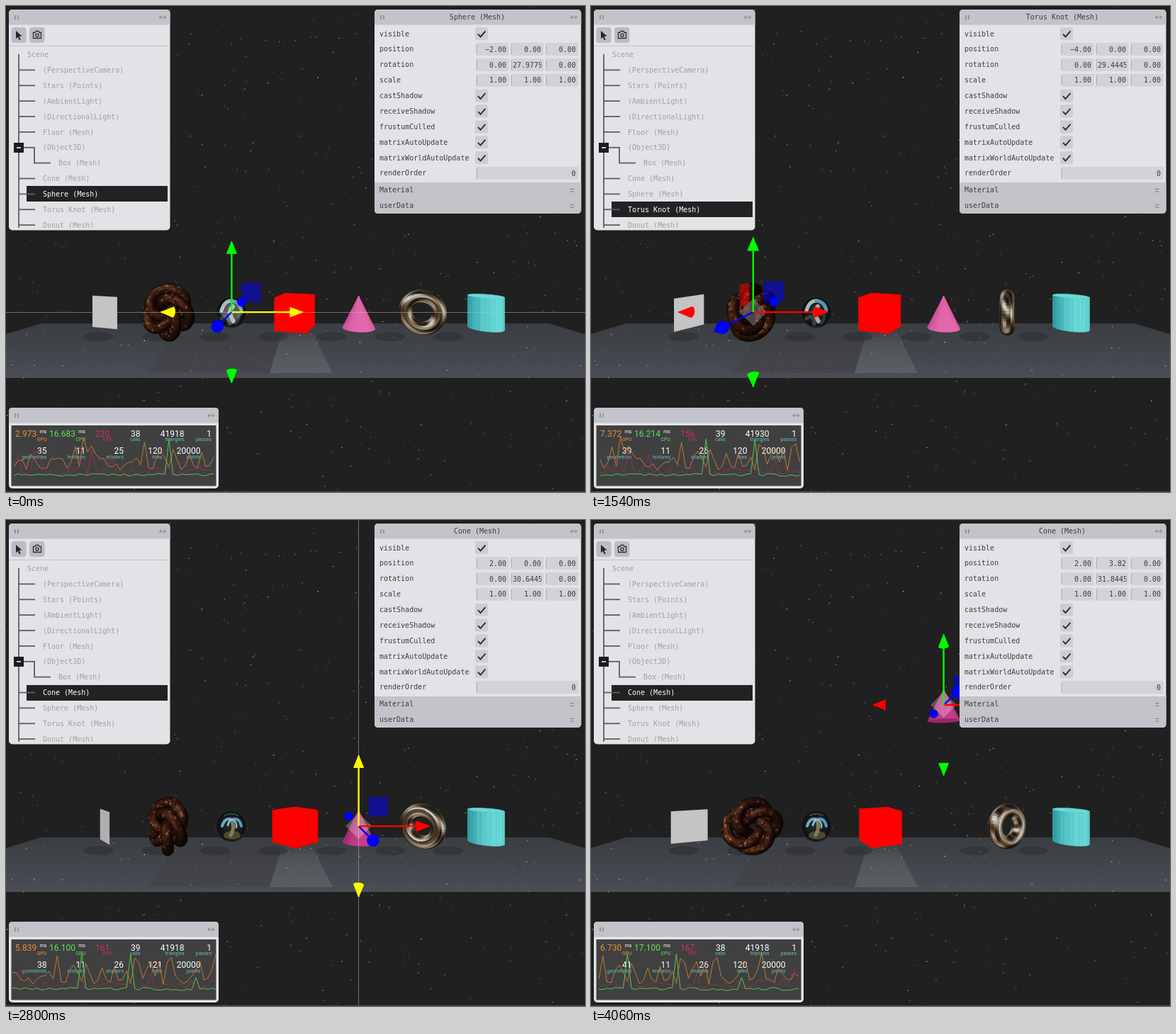
Write an HTML page with a canvas that moves like this. It is 817 by 686 pixels and loops after 4.13 s.

```html
<!DOCTYPE html>
<html lang="en">
<head>
<meta charset="utf-8">
<title>Scene inspector</title>
<style>
  html, body { margin: 0; width: 100%; height: 100%; overflow: hidden; background: #202020; }
  canvas, svg { position: absolute; left: 0; top: 0; width: 817px; height: 686px; }
  text { font: 10px "DejaVu Sans Mono", monospace; fill: #3c3d42; white-space: pre; }
  .dim { fill: #a0a1a5; }
  .on { fill: #fff; }
  .num, .lab { font-family: Roboto, sans-serif; fill: #fff; }
  .num { font-size: 12px; }
  .lab { font-size: 7px; fill: #5cc3c0; }
  .graph { fill: none; stroke-width: 1; }
</style>
</head>
<body>
<canvas id="stage" width="817" height="686"></canvas>
<svg id="ui" viewBox="0 0 817 686"></svg>
<script>
const LOOP = 4130, STEP = 70, TAU = Math.PI * 2;
const ctx = document.getElementById('stage').getContext('2d');
const ui = document.getElementById('ui');

// ---- helpers ----
const seeded = s => () => {
  s = (s + 0x6D2B79F5) | 0;
  let t = Math.imul(s ^ (s >>> 15), 1 | s);
  t = (t + Math.imul(t ^ (t >>> 7), 61 | t)) ^ t;
  return ((t ^ (t >>> 14)) >>> 0) / 4294967296;
};
const hash = n => seeded(n * 7919 + 13)();
const add = (a, b) => a.map((v, i) => v + b[i]);
const sub = (a, b) => a.map((v, i) => v - b[i]);
const mul = (a, k) => a.map(v => v * k);
const dot = (a, b) => a[0] * b[0] + a[1] * b[1] + a[2] * b[2];
const cross = (a, b) => [a[1] * b[2] - a[2] * b[1], a[2] * b[0] - a[0] * b[2], a[0] * b[1] - a[1] * b[0]];
const unit = a => mul(a, 1 / Math.hypot(...a));
const mix = (a, b, k) => a.map((v, i) => v + (b[i] - v) * k);
const clamp = v => Math.max(0, Math.min(1, v));
const rgb = c => `rgb(${c.map(Math.round).join()})`;
const turn = ([x, y, z], a) => [x * Math.cos(a) + z * Math.sin(a), y, z * Math.cos(a) - x * Math.sin(a)];

const CAM = [0, 2, 10], LIGHT = unit([-0.3, 0.6, 0.8]);
const CX = 408, CY = 342.5, FOCAL = 448;
const project = ([x, y, z]) => {
  const s = FOCAL / (CAM[2] - z);
  return [CX + x * s, CY + (CAM[1] - y) * s];
};

function flat(pts, fill, line = 0) {
  ctx.beginPath();
  pts.forEach(p => ctx.lineTo(...p));
  ctx.closePath();
  ctx.fillStyle = ctx.strokeStyle = fill;
  ctx.fill();
  if (line) { ctx.lineWidth = line; ctx.stroke(); }
}
const face = (pts, fill, line) => flat(pts.map(project), fill, line);
function line(a, b, color, width) {
  ctx.strokeStyle = color;
  ctx.lineWidth = width;
  ctx.beginPath();
  ctx.moveTo(...a);
  ctx.lineTo(...b);
  ctx.stroke();
}
function ellipse(x, y, rx, ry, fill) {
  ctx.fillStyle = fill;
  ctx.beginPath();
  ctx.ellipse(x, y, rx, ry, 0, 0, TAU);
  ctx.fill();
}

// ---- tube meshes ----
function tube(path, span, r, nu, nv) {
  const ring = (u, v) => {
    const a = path(u), b = path(u + 0.01), t = sub(b, a);
    const bi = unit(cross(t, add(a, b))), n = unit(cross(bi, t));
    const dir = add(mul(n, Math.cos(v)), mul(bi, Math.sin(v)));
    return { p: add(a, mul(dir, r)), dir };
  };
  const quads = [];
  for (let i = 0; i < nu; i++) for (let j = 0; j < nv; j++) {
    const at = (a, b) => ring((i + a) / nu * span, (j + b) / nv * TAU);
    quads.push({
      pts: [at(0, 0), at(1, 0), at(1, 1), at(0, 1)].map(q => q.p),
      n: at(0.5, 0.5).dir, seed: hash(i * 61 + j)
    });
  }
  return quads;
}
function drawTube(quads, pos, rot, shade) {
  quads.map(q => {
    const pts = q.pts.map(p => add(turn(p, rot), pos));
    const mid = mul(add(pts[0], pts[2]), 0.5), n = turn(q.n, rot);
    return { pts, n, view: unit(sub(CAM, mid)), far: Math.hypot(...sub(CAM, mid)), seed: q.seed };
  }).filter(q => dot(q.n, q.view) > -0.05)
    .sort((a, b) => b.far - a.far)
    .forEach(q => face(q.pts, rgb(shade(q)), 0.7));
}
// Knot winding `p` times round the axis with `q` lobes.
const knotPath = (p, q, r) => u => {
  const a = q / p * u, k = (2 + Math.cos(a)) * r / 2;
  return [k * Math.cos(u), k * Math.sin(u), r / 2 * Math.sin(a)];
};
const donut = tube(u => [0.5 * Math.cos(u), 0.5 * Math.sin(u), 0], TAU, 0.2, 56, 24);
const knot = tube(knotPath(3, 4, 0.5), 3 * TAU, 0.155, 210, 16);

function chrome({ n, view }) {
  const r = sub(mul(n, 2 * dot(n, view)), view);
  const k = clamp(0.45 + 0.42 * Math.sin(4.2 * r[1] + 1.6 * r[0] + 0.4) + 0.22 * Math.sin(5 * r[0] - 3 * r[2]));
  const base = k < 0.5 ? mix([26, 22, 20], [122, 97, 68], k * 2) : mix([122, 97, 68], [204, 208, 208], k * 2 - 1);
  return mix(base, [24, 21, 19], clamp(0.65 - dot(n, view)));
}
function rust({ n, view, seed }) {
  const lit = clamp(dot(n, LIGHT)), facing = clamp(dot(n, view));
  let c = mix([16, 7, 5], [104, 50, 28], lit * facing * (0.45 + 0.55 * seed));
  const shine = Math.pow(clamp(dot(n, unit(add(view, LIGHT)))), 14);
  c = mix(c, [186, 140, 106], shine * 0.35 * seed);
  return seed > 0.93 ? mix(c, [200, 160, 128], 0.45 * lit) : c;
}

// ---- scene ----
const rand = seeded(42);
const stars = Array.from({ length: 620 }, () => [rand() * 817, rand() * 686, 0.7 + rand() * 0.7, 0.2 + rand() * 0.6]);

function drawFloor(coneY) {
  const g = ctx.createLinearGradient(0, 448, 0, 525);
  g.addColorStop(0, '#3a3d41');
  g.addColorStop(1, '#4a4e55');
  flat([[50, 448], [766, 448], [1024, 525], [-207, 525]], g);
  flat([[235, 466], [385, 466], [372, 518], [200, 518]], 'rgba(62,59,56,.3)');
  const beam = ctx.createLinearGradient(0, 457, 0, 518);
  beam.addColorStop(0, 'rgba(92,97,102,0)');
  beam.addColorStop(0.35, 'rgba(92,97,102,.55)');
  beam.addColorStop(1, 'rgba(96,101,106,.75)');
  flat([[391, 457], [430, 457], [461, 518], [372, 518]], beam);
  for (let x = -6; x <= 6; x += 2) {
    if (x === 2 && coneY > 0.8) continue;
    const [sx, sy] = project([x - 0.75, -1, -0.9]);
    ellipse(sx, sy + 1, 21, 6.5, 'rgba(36,38,42,.4)');
  }
}

function drawStars() {
  for (const [x, y, s, a] of stars) {
    ctx.fillStyle = `rgba(225,225,225,${a})`;
    ctx.fillRect(x, y, s, s);
  }
}

function drawPlane(rot) {
  const pts = [[-0.5, 0.5], [0.5, 0.5], [0.5, -0.5], [-0.5, -0.5]]
    .map(([x, y]) => project(add(turn([x, y, 0], rot), [-6, 0, 0])));
  const g = 160 + 36 * Math.min(1, Math.abs(pts[1][0] - pts[0][0]) / 32);
  flat(pts, rgb([g, g, g]));
}

function drawBox(rot) {
  ctx.lineJoin = 'round';
  const c = [0, 1, 2, 3].map(i => turn([0.5, 0, 0.5], rot + i * TAU / 4));
  const at = (p, y) => [p[0], y, p[2]];
  face(c.map(p => at(p, 0.5)), '#fa0000', 1);
  c.forEach((p, i) => {
    const q = c[(i + 1) % 4];
    face([at(p, 0.5), at(q, 0.5), at(q, -0.5), at(p, -0.5)], '#ff0000', 1);
  });
}

// Round solid with flat facets; a top radius of 0 makes a cone.
function drawRound(pos, rot, top, seg, dark, light) {
  const pt = (i, r, y) => {
    const a = i / seg * TAU + rot;
    return add([r * Math.sin(a), y, r * Math.cos(a)], pos);
  };
  const ids = [...Array(seg).keys()];
  if (pos[1] - 0.5 > CAM[1]) face(ids.map(i => pt(i, 0.5, -0.5)), rgb(dark), 0.6);
  if (top) face(ids.map(i => pt(i, top, 0.5)), rgb(light), 0.6);
  for (const i of ids) {
    const n = unit(sub(pt(i + 0.5, 1, top ? 0 : 0.5), pos));
    if (dot(n, sub(CAM, pt(i + 0.5, 0.5, -0.5))) < -0.3) continue;
    const k = clamp(0.15 + 0.95 * dot(n, unit([0.15, 0.3, 1])) - 0.12 * hash(i));
    face([pt(i, top, 0.5), pt(i + 1, top, 0.5), pt(i + 1, 0.5, -0.5), pt(i, 0.5, -0.5)], rgb(mix(dark, light, k)), 0.5);
  }
}

function drawSphere(late) {
  const curve = (pts, color, w) => {
    ctx.strokeStyle = color;
    ctx.lineWidth = w;
    ctx.beginPath();
    ctx.moveTo(pts[0], pts[1]);
    ctx.quadraticCurveTo(...pts.slice(2));
    ctx.stroke();
  };
  ctx.save();
  ctx.translate(318, 432);
  ctx.beginPath();
  ctx.arc(0, 0, 22.5, 0, TAU);
  ctx.clip();
  const g = ctx.createRadialGradient(0, -2, 4, 0, 0, 22.5);
  g.addColorStop(0, '#222b2b');
  g.addColorStop(0.85, '#0d1112');
  g.addColorStop(1, '#262d2e');
  ellipse(0, 0, 23, 23, g);
  ctx.lineCap = 'round';
  if (late) {
    ellipse(1, 13, 12, 6, '#4a4a34');
    curve([-1, 13, 5, 3, 1, -7], '#857a58', 5);
    curve([-13, 0, -9, -13, 1, -9], '#6fa9c4', 4);
    curve([1, -9, 11, -13, 14, 0], '#5b9abb', 4);
    curve([-5, -1, -3, -9, 1, -9], '#9cc9d8', 2.5);
    curve([1, -9, 8, -7, 7, 2], '#83bad0', 2.5);
    curve([-9, -15, 0, -20, 9, -15], '#3c4a4c', 2);
  } else {
    curve([-14, -2, -10, -16, 0, -16], '#a9b8bd', 5);
    curve([0, -16, 11, -15, 14, -3], '#5d92b2', 5);
    curve([2, -8, -6, 0, 3, 13], '#a8aba6', 6);
    curve([-14, 9, -4, 2, -3, 17], '#39443f', 5);
    curve([9, 1, 14, 9, 6, 16], '#2b3a42', 4);
  }
  ctx.restore();
}

// ---- transform handles ----
function gizmo(pos, hot) {
  const size = Math.hypot(...sub(CAM, pos)) * 0.3937;
  const at = (x, y, z) => add(pos, mul([x, y, z], size));
  const put = (x, y, z) => project(at(x, y, z));
  const [ox, oy] = project(pos);
  const guide = 'rgba(190,190,190,.5)';
  const crisp = v => Math.floor(v) + 0.5;
  if (hot.includes('x')) line([0, crisp(oy)], [817, crisp(oy)], guide, 1);
  if (hot.includes('y')) line([crisp(ox - 0.5), 0], [crisp(ox - 0.5), 686], guide, 1);
  if (hot.includes('z')) line([CX, CY], [ox + (ox - CX) * 3, oy + (oy - CY) * 3], guide, 1);

  const plane = (a, b, fill) => flat([[1, 1], [3, 1], [3, 3], [1, 3]].map(([p, q]) =>
    put(...add(mul(a, p * 0.075), mul(b, q * 0.075)))), fill);
  const X = [1, 0, 0], Y = [0, 1, 0], Z = [0, 0, 1];
  plane(X, Y, 'rgba(0,0,255,.5)');
  const view = unit(sub(CAM, pos));
  if (Math.abs(view[0]) > 0.2) plane(Y, Z, 'rgba(255,0,0,.5)');
  if (Math.abs(view[1]) > 0.2) plane(X, Z, 'rgba(0,255,0,.5)');

  const arrow = (axis, side, color) => {
    const i = axis.indexOf(1);
    const rim = [...Array(16).keys()].map(k => {
      const v = [0, 0, 0];
      v[i] = 0.45 * side;
      v[(i + 1) % 3] = 0.038 * Math.cos(k / 16 * TAU);
      v[(i + 2) % 3] = 0.038 * Math.sin(k / 16 * TAU);
      return put(...v);
    });
    const tip = put(...mul(axis, 0.545 * side));
    flat(rim, color);
    rim.forEach((p, k) => flat([p, rim[(k + 1) % 16], tip], color, 0.3));
  };
  const diamond = () => flat([put(0, 0.1, 0), put(0.1, 0, 0), put(0, -0.1, 0), put(-0.1, 0, 0)],
    hot === 'xyz' ? '#ffff00' : 'rgba(255,255,255,.25)');
  diamond();
  [['z', Z, '#0000ff'], ['x', X, '#ff0000'], ['y', Y, '#00ff00']].forEach(([name, axis, base]) => {
    const color = hot.includes(name) ? '#ffff00' : base;
    arrow(axis, -1, color);
    line([ox, oy], put(...mul(axis, 0.46)), color, 2.4);
    arrow(axis, 1, color);
  });
  if (hot === 'xyz') diamond();
}

// ---- panels ----
const text = (x, y, s, cls = '', id = '', anchor = 'start', more = '') =>
  `<text x="${x}" y="${y}" class="${cls}" id="${id}" text-anchor="${anchor}" ${more}>${s}</text>`;
const rect = (x, y, w, h, fill, r = 0) => `<rect x="${x}" y="${y}" width="${w}" height="${h}" rx="${r}" fill="${fill}"/>`;
const stroke = (d, color, w, more = '') => `<path d="${d}" fill="none" stroke="${color}" stroke-width="${w}" ${more}/>`;
const panel = (x, y, w, h) => rect(x, y, w, h, '#e2e3e6', 5) +
  `<path d="M${x} ${y + 21.5}v-16.5q0-5 5-5h${w - 10}q5 0 5 5v16.5z" fill="#c3c4ca"/>` +
  stroke(`M${x + 9} ${y + 8}v6m4-6v6`, '#8b8c92', 1.6) +
  stroke(`M${x + w - 14.5} ${y + 11}h8m-6-2.5l-2.5 2.5 2.5 2.5m4-5l2.5 2.5-2.5 2.5`, '#7d7e84', 1);

const names = ['Scene', '(PerspectiveCamera)', 'Stars (Points)', '(AmbientLight)', '(DirectionalLight)',
  'Floor (Mesh)', '(Object3D)', 'Box (Mesh)', 'Cone (Mesh)', 'Sphere (Mesh)', 'Torus Knot (Mesh)', 'Donut (Mesh)'];
const rowY = i => 68.5 + 21.88 * i;

function treePanel() {
  let s = panel(4, 5, 227.5, 311.5) + rect(4, 55.8, 227.5, 1.2, '#c6c7ca') +
    rect(7.5, 30, 21, 22, '#bcbdc4', 4) + rect(33, 30, 21.5, 22, '#bcbdc4', 4) +
    '<path d="M14 35l8.5 7.5-4 .4 2.2 4.3-2 1-2.1-4.4-2.6 2.7z" fill="#26272b"/>' +
    stroke('M38.5 37.5h2.5l1.2-2h3.6l1.2 2h2.5v8h-11z', '#303136', 1.3) +
    '<circle cx="44" cy="41.3" r="2.1" fill="none" stroke="#303136" stroke-width="1.3"/>' +
    '<clipPath id="tree"><rect x="4" y="58" width="228" height="255"/></clipPath><g clip-path="url(#tree)">' +
    '<rect id="mark" x="29" width="199" height="22" fill="#222"/>';
  names.forEach((n, i) => {
    const y = rowY(i), x = i === 0 ? 30 : i === 7 ? 74 : 52;
    if (i) s += stroke(i === 7 ? `M40 ${rowY(6)}V${y}H63` : `M18 ${y}H41`, '#5d5e63', 1.8);
    s += text(x, y + 3.6, n, 'dim', 'row' + i);
  });
  return s + stroke('M18 68V313', '#5d5e63', 1.8) + rect(11, 193, 14, 14, '#1c1c1e') +
    stroke('M15 200h6', '#fff', 1.5) + '</g>';
}

function propPanel() {
  const y = i => 39.2 + 21.88 * i;
  let s = panel(520, 5, 291.5, 288) + text(665, 18.5, '', '', 'title', 'middle') +
    '<clipPath id="field"><rect x="712" y="74" width="43.5" height="18"/></clipPath>';
  const field = (x, w, cy) => rect(x, cy - 9, w, 18, '#d2d3d6', 2) + rect(x + 1, cy - 7, 1, 14, '#b3b4b8');
  ['visible', 'position', 'rotation', 'scale', 'castShadow', 'receiveShadow', 'frustumCulled',
    'matrixAutoUpdate', 'matrixWorldAutoUpdate', 'renderOrder'].forEach((n, i) => {
    const cy = y(i);
    s += text(527, cy + 3.3, n);
    if (i === 9) s += field(663, 145, cy) + text(804, cy + 3.6, '0', '', '', 'end');
    else if (i > 0 && i < 4) for (let k = 0; k < 3; k++) {
      const turnField = i === 2 && k === 1;
      s += field(663 + 49 * k, 46.5, cy) + text(turnField ? 715 : 706 + 49 * k, cy + 3.6, i === 3 ? '1.00' : '0.00', '',
        `v${i}${k}`, turnField ? 'start' : 'end', turnField ? 'clip-path="url(#field)"' : '');
    } else s += rect(662, cy - 9, 18, 18, '#cdced2', 2) + stroke(`M666 ${cy + 0.5}l3.5 3.8 7-8`, '#2c2d31', 1.9);
  });
  s += '<path d="M520 249H811.500V288q0 5-5 5H525q-5 0-5-5z" fill="#c3c4ca"/>';
  ['Material', 'userData'].forEach((n, i) => {
    const cy = 260 + 22 * i;
    s += text(527, cy + 3.3, n) + stroke(`M796 ${cy - 1.5}h5.500m-5.500 3.500h5.500`, '#77787d', 1);
  });
  return s;
}

const ORANGE = '#e8913a', GREEN = '#5be35b', PINK = '#cf2f63';
const paint = c => `style="fill:${c}"`;
function statPanel() {
  let s = panel(4, 567, 296, 114) + rect(7.5, 592, 289, 85.5, '#404040') +
    text(13, 607.7, '', 'num', 'gpu', 'start', paint(ORANGE)) + text(61, 607.7, '', 'num', 'cpu', 'start', paint(GREEN)) +
    text(126, 607.7, '', 'num', 'fps', 'start', paint(PINK)) +
    text(57.5, 603, 'ms', 'lab', '', 'end', paint('#fff')) + text(112, 603, 'ms', 'lab', '', 'end', paint('#fff')) +
    text(57.5, 614.3, 'GPU', 'lab', '', 'end', paint(ORANGE)) + text(112, 614.3, 'CPU', 'lab', '', 'end', paint(GREEN)) +
    text(149.5, 614.3, 'FPS', 'lab', '', 'end', paint(PINK));
  [['calls', 189.5, 0], ['triangles', 251.5, 0], ['passes', 290, 0], ['geometries', 57.5, 1], ['textures', 112, 1],
    ['shaders', 166, 1], ['lines', 220.5, 1], ['points', 274.5, 1]].forEach(([n, x, r]) => {
    s += text(x, 607.7 + 24.2 * r, '', 'num', n, 'end') + text(x, 614.3 + 24.2 * r, n, 'lab', '', 'end');
  });
  return s + [['gOrange', '#bd7a33'], ['gPink', '#94304f'], ['gGreen', '#54c454']]
    .map(([id, c]) => `<polyline id="${id}" class="graph" stroke="${c}"/>`).join('');
}
ui.innerHTML = treePanel() + propPanel() + statPanel();
const byId = id => document.getElementById(id);
const set = (id, s) => { byId(id).textContent = s; };

// time, gpu, cpu, fps, calls, triangles, geometries, shaders, lines
const stats = [
  [0, 2.973, 16.683, 220, 38, 41918, 35, 25, 120],
  [630, 4.526, 16.129, 213, 38, 41918, 37, 26, 120],
  [1540, 7.372, 16.214, 156, 39, 41930, 39, 26, 120],
  [1960, 3.892, 13.15, 219, 38, 41918, 35, 25, 120],
  [2800, 5.839, 16.1, 161, 39, 41918, 38, 26, 121],
  [3500, 5.854, 16.3, 176, 42, 42062, 41, 26, 122],
  [4060, 6.73, 17.1, 167, 38, 41918, 41, 26, 120]
];
set('passes', 1);
set('textures', 11);
set('points', 20000);

function drawStats(t) {
  const row = stats.reduce((a, b) => Math.abs(b[0] - t) < Math.abs(a[0] - t) ? b : a);
  ['', 'gpu', 'cpu', 'fps', 'calls', 'triangles', 'geometries', 'shaders', 'lines'].forEach((id, i) => {
    if (i) set(id, i < 3 ? row[i].toFixed(3) : row[i]);
  });
  const shift = t * 0.044, gap = 5.75;
  const trace = (id, level) => {
    const pts = [];
    for (let k = Math.ceil((shift + 8) / gap); k * gap - shift < 297; k++)
      pts.push((k * gap - shift).toFixed(1) + ',' + level(k).toFixed(1));
    byId(id).setAttribute('points', pts.join(' '));
  };
  trace('gOrange', k => 656 - 20 * hash(k + 500) - (hash(k + 900) > 0.66 ? 12 + 20 * hash(k + 40) : 0));
  trace('gPink', k => 663 - 18 * hash(k + 1500) - (hash(k + 1900) > 0.84 ? 22 : 0));
  const spikes = { 40: 50, 52: 48, 68: 16 };
  trace('gGreen', k => 664 - 4 * hash(k + 2500) - (spikes[k] || 0));
}

// ---- timeline ----
const picks = [
  { from: 0, row: 9, x: -2, hot: 'x' },
  { from: 350, row: 10, x: -4, hot: 'x' },
  { from: 630, row: 10, x: -4, hot: '' },
  { from: 1820, row: 8, x: 2, hot: 'xyz' },
  { from: 2380, row: 8, x: 2, hot: 'y' },
  { from: 3780, row: 8, x: 2, hot: '' }
];

function render(t) {
  const pick = picks.filter(p => p.from <= t).pop();
  const rot = 27.9779 + t / 1050;
  const p = clamp((t - 2870) / 775), lift = 3.82 * p * p * (3 - 2 * p);
  const picked = pick.row === 8, y = picked ? lift : 0;

  ctx.fillStyle = '#202020';
  ctx.fillRect(0, 0, 817, 686);
  drawFloor(lift);
  drawStars();
  drawPlane(rot);
  drawTube(knot, [-4, 0, 0], rot, rust);
  drawSphere(t >= 1820);
  drawBox(rot);
  drawRound([2, lift, 0], rot, 0, 32, picked ? [150, 40, 102] : [200, 78, 148], picked ? [198, 62, 138] : [232, 104, 174]);
  drawTube(donut, [4, 0, 0], rot, chrome);
  drawRound([6, 0, 0], rot, 0.5, 24, [50, 160, 166], [104, 216, 216]);
  if (lift > 0 && pick.hot) ellipse(497, 432, 1.6, 1.6, '#8c8c8c');
  gizmo([pick.x, y, 0], pick.hot);
  line([0, 685.5], [817, 685.5], '#4a4a4a', 1);

  names.forEach((n, i) => byId('row' + i).setAttribute('class', i === pick.row ? 'on' : 'dim'));
  byId('mark').setAttribute('y', Math.round(rowY(pick.row) - 11));
  set('title', names[pick.row]);
  set('v10', pick.x.toFixed(2).replace('-', '−'));
  set('v11', y.toFixed(2));
  set('v21', rot.toFixed(6).slice(0, 7));
  drawStats(t);
}

const start = performance.now();
let shown = -1;
function tick() {
  const step = Math.floor(((performance.now() - start) % LOOP) / STEP);
  if (step !== shown) render((shown = step) * STEP);
  requestAnimationFrame(tick);
}
tick();
</script>
</body>
</html>
```
